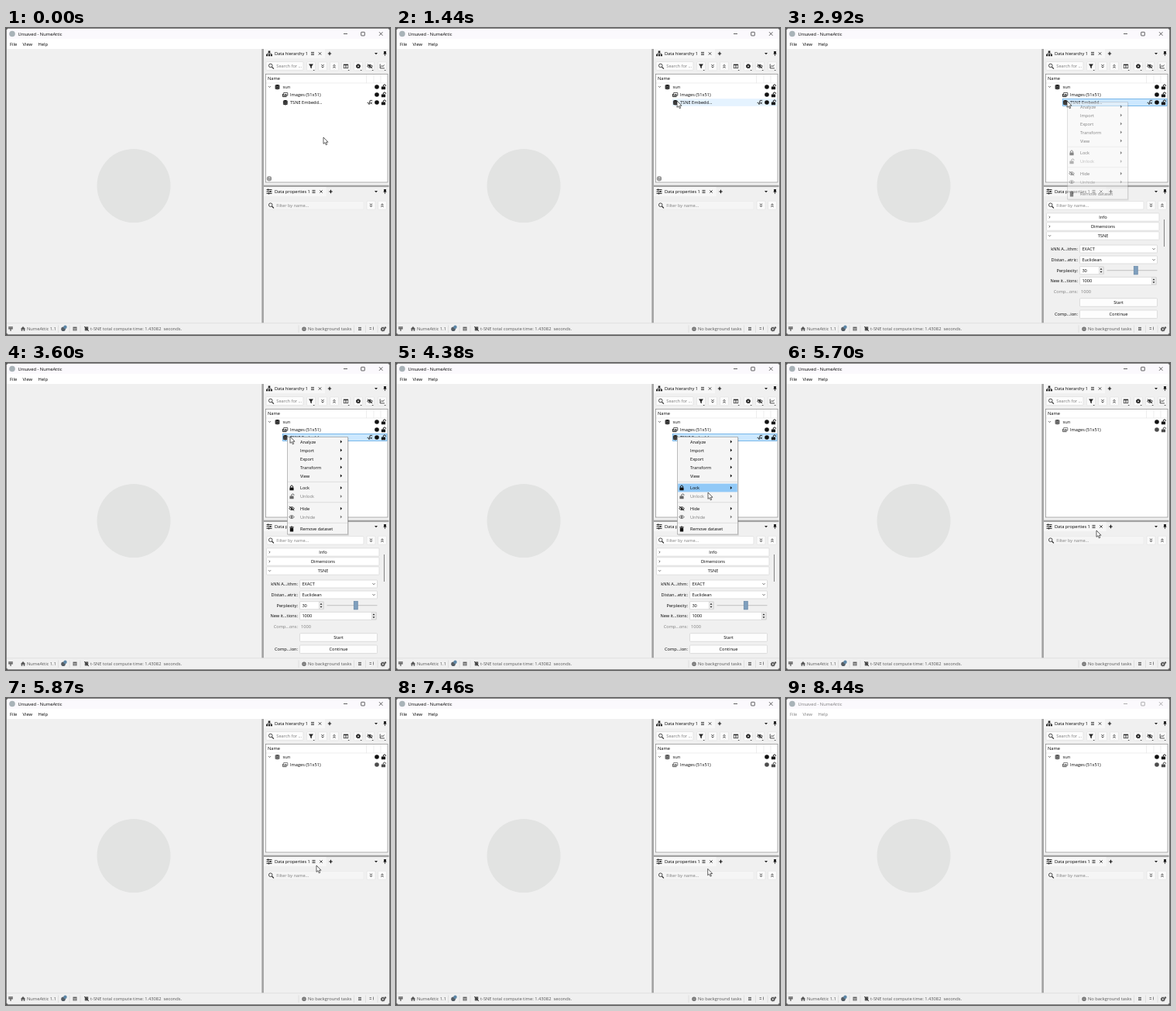
An HTML page that plays this animation: 496x396 px, repeating every 8.5 s.

```html
<!DOCTYPE html>
<html lang="en">
<head>
<meta charset="utf-8">
<title>Data window</title>
<style>
html, body { margin: 0; width: 100%; height: 100%; overflow: hidden; background: #555; }
svg { display: block; width: 496px; height: 396px; }
text { font: 5.65px "Open Sans", "Noto Sans", sans-serif; fill: #000; white-space: pre; }
.status text { font-size: 5.75px; fill: #555; }
.title text { font-size: 5.8px; }
text.dim { fill: #7c7c7c; }
.mid { text-anchor: middle; }
.end { text-anchor: end; }
.inactive { opacity: .5; }
</style>
</head>
<body>
<svg id="stage" viewBox="0 0 496 396"></svg>
<script>
const LOOP = 8500, STEP = 70;

const text = (x, y, s, cls = '') => `<text x="${x}" y="${y + 2}" class="${cls}">${s}</text>`;
const rect = (x, y, w, h, fill, stroke = 'none', rx = 0) =>
  `<rect x="${x}" y="${y}" width="${w}" height="${h}" fill="${fill}" stroke="${stroke}" stroke-width=".7" rx="${rx}"/>`;
const line = (d, color = '#222', width = .9) =>
  `<path d="${d}" fill="none" stroke="${color}" stroke-width="${width}"/>`;
const solid = (d, color = '#222') => `<path d="${d}" fill="${color}"/>`;
const dot = (x, y, r, fill = '#111', stroke = 'none') =>
  `<circle cx="${x}" cy="${y}" r="${r}" fill="${fill}" stroke="${stroke}" stroke-width=".8"/>`;
const at = (x, y, s) => `<g transform="translate(${x} ${y})">${s}</g>`;
const group = (id, s, attrs = '') => `<g id="${id}" ${attrs}>${s}</g>`;

// Icons are centred on the origin.
const chevrons = dir => line(`M-1.6 ${-2 * dir}L0 ${-.6 * dir} 1.6 ${-2 * dir}M-1.6 ${.4 * dir}L0 ${1.8 * dir} 1.6 ${.4 * dir}`, '#222', .9);
const chevron = line('M-1.6 -.8L0 .8 1.6 -.8', '#333', .7);
const caret = solid('M-2 -1H2L0 1.2Z');
const cross = line('M-1.7 -1.7L1.7 1.7M1.7 -1.7L-1.7 1.7', '#222', .8);
const plus = line('M-2.2 0H2.2M0 -2.2V2.2', '#111', 1.1);
const bars = line('M-2 -1.6H2M-2 0H2M-2 1.6H2', '#333', .8);
const search = dot(-.8, -.8, 2.3, 'none', '#222') + line('M1 1L3.4 3.4', '#222', 1.2);
const pin = solid('M-1.5 -3H1.5V0H2V.8H.4V3H-.4V.8H-2V0H-1.5Z');
const tree = rect(-1.3, -3.5, 2.6, 2.4, '#222') + line('M0 -1V1M-2.8 1.5V0H2.8V1.5', '#222', .7) +
  [-4, -1.1, 1.8].map(x => rect(x, 1.1, 2.2, 2.2, '#222')).join('');
const sliders = line('M-3.5 -2.4H3.5M-3.5 0H3.5M-3.5 2.4H3.5', '#222', 1) +
  line('M-1.5 -3.4V-1.4M1.5 -1V1M-.5 1.4V3.4', '#222', 1.2);
const funnel = solid('M-3 -2.8H3L.8 .2V3L-.8 2V.2Z');
const columns = rect(-2.8, -2.3, 5.6, 4.8, 'none', '#222') + line('M-2.8 -1.7H2.8M0 -2V2.3', '#222', 1);
const gear = color => `<circle r="2.5" fill="${color}" stroke="${color}" stroke-width="1.1" stroke-dasharray="1.1 .86"/>` + dot(0, 0, .9, '#fafafa');
const eye = c => line('M-3.4 0Q0 -4 3.4 0Q0 4 -3.4 0Z', c, .9) + dot(0, 0, 1.3, c);
const hiddenEye = eye('#222') + line('M-3.2 -2.7L3.2 2.7', '#222', 1);
const chart = line('M-2.8 -2.8V2.6H3M-1.8 1L-.3 -.8 .8 .4 2.6 -1.8', '#222', .8);
const lock = (c, open) => rect(-2.6, -.6, 5.2, 3.8, c, 'none', .5) +
  line(open ? 'M-.2 -.5V-2.2Q1.6 -4.2 3 -2.2V-1.3' : 'M-1.6 -.5V-2Q0 -4.4 1.6 -2V-.5', c, 1);
const cylinder = solid('M-2.9 -2.2Q0 -4 2.9 -2.2V2.4Q0 4 -2.9 2.4Z', '#111') +
  line('M-2.9 -1.2Q0 .2 2.9 -1.2M-2.9 1Q0 2.4 2.9 1', '#fff', .4);
const images = rect(-1.9, -2.6, 5.2, 3.8, '#fff', '#111', .4) + line('M-3 -1V2.6H2', '#111', .9) + solid('M-1.4 .8L.4 -1.2 1.4 0 2 -.6 3 .8Z');
const root = line('M-3.4 .5L-2.2 .2 -1 2.6 .2 -2.6H3.2M.4 -.6L2.8 2.2M2.8 -.6L.4 2.2', '#111', .8);
const bin = rect(-2.2, -1.7, 4.4, 5, '#111', 'none', .5) + line('M-2.8 -2.5H2.8M-1 -3.2H1', '#111', .9);
const grid = rect(-2.5, -2.4, 5, 4.8, '#555') + line('M-2.5 -.6H2.5M-2.5 1H2.5M0 -1V2.4', '#eee', .5);
const home = solid('M-3.2 .2L0 -3 3.2 .2H2.3V2.8H.7V.8H-.7V2.8H-2.3V.2Z', '#555');

const button = (x, y, icon, menu) => rect(x - 5.5, y - 5.5, 11, 11, '#fafafa', '#e2e2e2', 1) + at(x, y, icon) +
  (menu ? solid(`M${x + 2.5} ${y + 4.6}h2.4l-1.2 1.1z`) : '');

const tab = (y, icon, label, shift) => rect(333, y - 6, 79 + shift, 12, '#f7f7f7') + at(340, y, icon) + text(347, y, label) +
  at(396 + shift, y, bars) + at(405.5 + shift, y, cross) + at(418 + shift, y, plus) + at(478, y, caret) + at(489.5, y, pin);

const access = y => dot(479, y, 2.8) + at(487.5, y, lock('#111', true));

function windowFrame() {
  return rect(.5, .5, 495, 395, '#f0f0f0', '#777', 3) + rect(1, 1, 494, 14, '#fbf9fd', 'none', 3) + rect(1, 14, 494, 13, '#fff') +
    dot(8, 7.5, 3.8, '#a9b3b8') +
    group('title', text(15.5, 7.5, 'Unsaved - NumeAttic') + text(5, 20.5, 'File') + text(21.5, 20.5, 'View') + text(41.5, 20.5, 'Help') +
      line('M436 7.5H441M482 5.2L486.5 9.8M486.5 5.2L482 9.8', '#222', .7) + rect(458.7, 5.3, 4.6, 4.6, 'none', '#222', .5), 'class="title"') +
    dot(165, 203.5, 47.5, '#e2e3e2') +
    rect(330.3, 27, 2.6, 353.5, '#a2a2a2') + rect(333, 202.7, 161.5, 2.4, '#a2a2a2');
}

function hierarchy() {
  const tools = [[394, funnel, 1], [409, chevrons(1)], [424, chevrons(-1)], [439, columns, 1], [455, gear('#222'), 1], [470, hiddenEye, 1], [486, chart, 1]];
  return tab(33, tree, 'Data hierarchy 1', 0) +
    rect(336, 43.5, 48, 11, '#fcfcfc', '#dedede', 1) + at(342.5, 49.3, search) + text(349.3, 49.3, 'Search for ...', 'dim') +
    tools.map(([x, icon, menu]) => button(x, 49.3, icon, menu)).join('') +
    rect(335.5, 59.5, 157.5, 139.5, '#fff', '#8c8c8c') + text(338, 65.3, 'Name') +
    line('M465.5 60V71M475 60V71M484 60V71M336 71H493', '#e3e3e3', .6) +
    at(340.5, 75.8, chevron) +
    group('sun', at(350.5, 76, cylinder)) + text(357.5, 76, 'sun') + access(76) +
    group('images', at(360.5, 86, images) + access(86)) + text(367, 86, 'Images (51x51)') +
    group('dataset', rect(357.5, 91.5, 134.5, 9, 'none') + at(360.8, 96.2, cylinder) + text(367, 96, 'TSNE Embedd...') + at(470, 96, root) + access(96)) +
    group('help', dot(340, 194.3, 3.2, '#9a9a9a') + `<text x="340" y="196" class="mid" style="font-size:5px;fill:#fff">?</text>`);
}

function properties() {
  const section = (y, name, icon) => rect(336.5, y - 5.2, 145.5, 10.4, '#fff', '#d6d6d6', .5) + at(340.5, y, icon) + text(409.5, y, name, 'mid');
  const label = (y, s, cls = '') => text(377, y, s, 'end ' + cls);
  const field = (y, s, w = 100) => rect(379.5, y - 5, w, 10, '#fff', '#d2d2d2', .6) + text(382.4, y, s);
  const combo = (y, s) => field(y, s) + at(475, y, chevron);
  const spin = (y, s, w) => field(y, s, w) + at(376 + w, y, rect(-2.6, -4.4, 5.4, 8.8, '#f2f2f2', '#d2d2d2') +
    solid('M-1.5 -1H1.5L0 -3ZM-1.5 1H1.5L0 3Z', '#222'));
  const action = (y, s) => rect(379.5, y - 5.3, 100, 10.6, '#fdfdfd', '#d2d2d2', 1) + text(429.5, y, s, 'mid');
  const side = line('M-.8 -1.4L.6 0 -.8 1.4', '#333', .7);
  return tab(211, sliders, 'Data properties 1', 1.5) +
    group('filter', rect(337, 223.5, 125, 10.5, '#fff', '#dedede', 1)) +
    at(342.5, 229, search) + text(349.3, 229, 'Filter by name...', 'dim') +
    button(471.5, 228.7, chevrons(1)) + button(486, 228.7, chevrons(-1)) +
    group('panel', section(244, 'Info', side) + section(256, 'Dimensions', side) + section(268, 'TSNE', chevron) +
      rect(488, 247, 1, 35, '#858585') +
      label(285, 'kNN A...ithm:') + combo(285, 'EXACT') +
      label(299, 'Distan...etric:') + combo(299, 'Euclidean') +
      label(312.7, 'Perplexity:') + spin(312.7, '30', 31) +
      line('M414.5 312.7H479.5', '#c9c9c9', 1.2) + rect(449.3, 307.3, 5, 10.6, '#7f9fbd', '#6788a6') +
      label(326.3, 'New it...tions:') + spin(326.3, '1000', 99) +
      label(340, 'Comp...ons:', 'dim') + text(381, 340, '1000', 'dim') +
      action(354, 'Start') + label(369.3, 'Comp...ion:') + action(369.3, 'Continue'));
}

function statusBar() {
  return `<g class="status">` + line('M1 380.7H495', '#dcdcdc', .7) +
    at(6, 388, solid('M-2.8 -2.8H2.8V.4H.6V3H-.6V.4H-2.8Z', '#555') + line('M-2.8 -1.2H2.8', '#eee', .5)) +
    at(22, 388, home) + text(27, 388.3, 'NumeAttic 1.1') +
    line('M67.5 383.5V393M82 383.5V393M96 383.5V393M378 383.5V393M449.5 383.5V393M464.5 383.5V393M480 383.5V393', '#d4d4d4', .6) +
    dot(74, 388.3, 2.8, '#555d64') + dot(76.5, 385.8, 2.2, '#5d87a8') + at(89, 388, grid) +
    at(104, 388, rect(-2.2, -2.6, 4.4, 5, '#555') + line('M-3 -3L3 3', '#333', .9)) +
    text(109, 388.3, 't-SNE total compute time: 1.43082  seconds.') +
    dot(385, 388.3, 2.7, '#666') + line('M382.5 388.3H387.5M385 386V390.6', '#ddd', .4) +
    text(390, 388.3, 'No background tasks') + at(457, 388, bars) +
    line('M469.5 386.5H472M469.5 388.5H472M474.5 385.5V389.5', '#666', .8) +
    at(486.8, 388.5, gear('#555')) + dot(490, 386.5, 1.2, '#555') + '</g>';
}

const items = [
  { y: 101.5, name: 'Analyze', sub: 1 }, { y: 112.5, name: 'Import', sub: 1 }, { y: 123.5, name: 'Export', sub: 1 },
  { y: 134.5, name: 'Transform', sub: 1 }, { y: 145.5, name: 'View', sub: 1 },
  { y: 161, name: 'Lock', sub: 1, icon: lock('#111') }, { y: 172, name: 'Unlock', sub: 1, off: 1, icon: lock('#666', true) },
  { y: 187.7, name: 'Hide', sub: 1, icon: hiddenEye }, { y: 198.6, name: 'Unhide', sub: 1, off: 1, icon: eye('#666') },
  { y: 214.3, name: 'Remove dataset', icon: bin },
];

function contextMenu() {
  return group('menu', rect(364.5, 96.5, 78.3, 126, 'rgba(0,0,0,.13)') + rect(363.5, 95.5, 78, 125.5, '#f5f5f5', '#a0a0a0') +
    group('mark', rect(364.2, -5.4, 76.6, 10.8, '#91c9f7')) +
    line('M364 153.3H441M364 179.7H441M364 206.3H441', '#d5d5d5', .7) +
    items.map(i => at(369, i.y, i.icon || '') + text(380, i.y, i.name, i.off ? 'dim' : '') +
      (i.sub ? solid(`M431.9 ${i.y - 2}L434.1 ${i.y} 431.9 ${i.y + 2}Z`, i.off ? '#7c7c7c' : '#111') : '')).join(''));
}

const pointer = group('cursor', `<path d="M0 0V8.4L1.9 6.7 3.3 9.8 4.7 9.2 3.4 6.2H6Z" fill="#fff" stroke="#222" stroke-width=".7"/>`);

const stage = document.getElementById('stage');
stage.innerHTML = windowFrame() + hierarchy() + properties() + statusBar() + contextMenu() + pointer;
const el = Object.fromEntries([...stage.querySelectorAll('[id]')].map(e => [e.id, e]));
const row = el.dataset.querySelector('rect');

// Pointer moves: start, end, target x, target y.
const moves = [
  [250, 1160, 376, 95], [1160, 1440, 363, 94], [3320, 3600, 367, 95], [3740, 4380, 403, 167],
  [4380, 4650, 402, 199], [4650, 4990, 401, 216], [7390, 8160, 474, 400],
];

function pointerAt(t) {
  let x = 410, y = 141;
  for (const [start, end, tx, ty] of moves) {
    if (t < start) break;
    const p = t >= end ? 1 : Math.floor((t - start) / STEP) * STEP / (end - start);
    const k = p * p * (3 - 2 * p);
    x += (tx - x) * k;
    y += (ty - y) * k;
  }
  return [x, y];
}

const show = (e, on) => { e.style.display = on ? '' : 'none'; };

function render(t) {
  const [x, y] = pointerAt(t);
  el.cursor.setAttribute('transform', `translate(${x} ${y})`);

  const selected = t >= 1900, hovered = y < 101;
  row.setAttribute('fill', selected ? '#cce8ff' : hovered ? '#e5f3ff' : 'none');
  row.setAttribute('stroke', t >= 2920 ? '#4a9fe0' : selected ? '#99d1ff' : hovered ? '#e5f3ff' : 'none');
  show(el.dataset, t < 5600);
  show(el.help, !selected);

  const loaded = t >= 1970 && t < 5670;
  show(el.panel, loaded);
  el.filter.style.opacity = loaded ? 1 : .35;

  show(el.menu, t >= 2920 && t < 5600);
  el.menu.style.opacity = t < 2990 ? .5 : t >= 5530 ? .4 : 1;
  const active = items.filter(i => !i.off && y > i.y - 5.5).pop();
  show(el.mark, active);
  if (active) el.mark.setAttribute('transform', `translate(0 ${active.y})`);

  el.images.style.opacity = el.sun.style.opacity = t >= 5670 ? .75 : 1;
  el.title.classList.toggle('inactive', t >= 8300);
}

function tick() {
  render(performance.now() % LOOP);
  requestAnimationFrame(tick);
}
tick();
</script>
</body>
</html>
```
